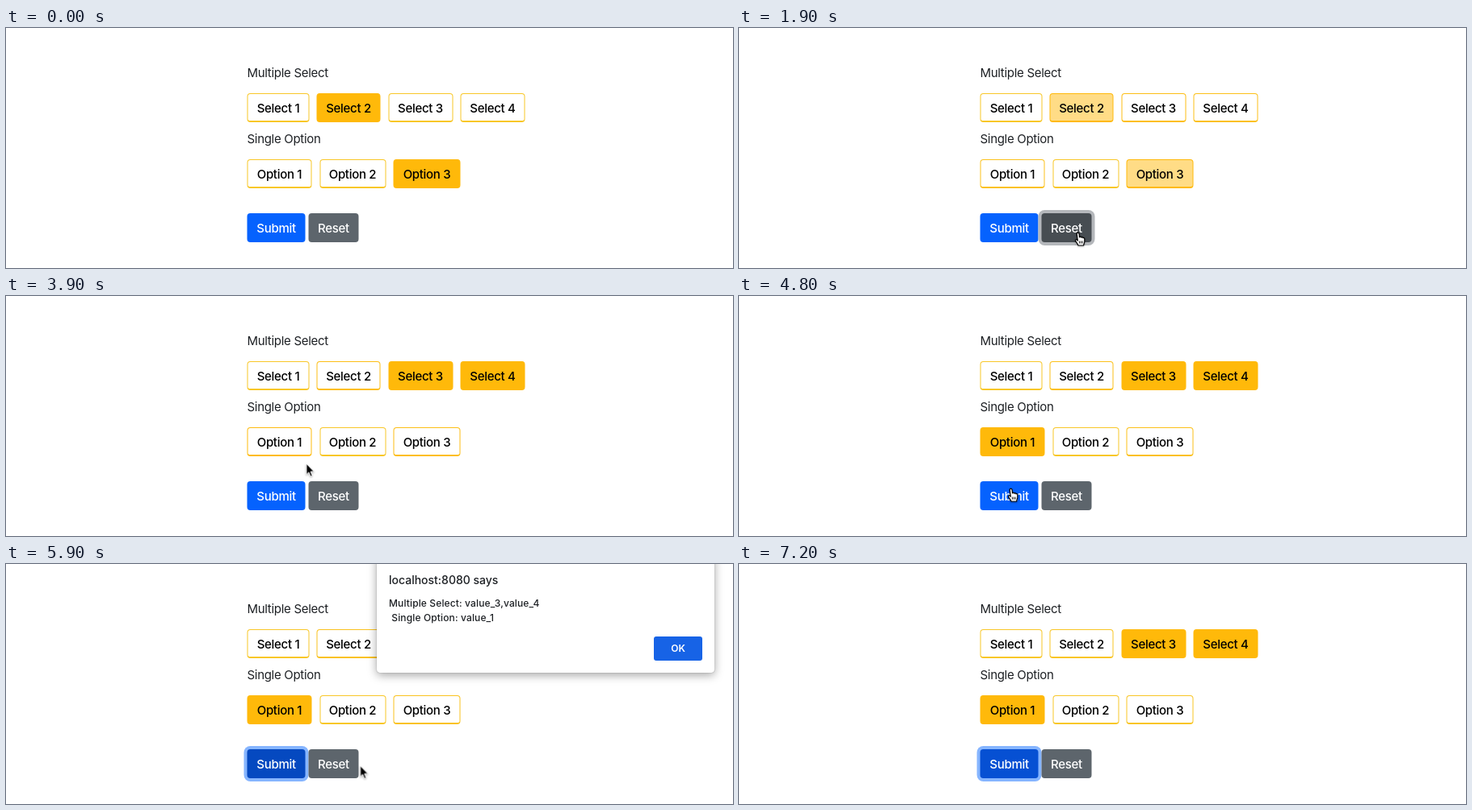
Recreate the animation shown at these times as an HTML page. Size 900 px wide and 298 px high, loop 8000 ms.

```html
<!DOCTYPE html>
<html lang="en">
<head>
<meta charset="utf-8">
<title>Toggle buttons</title>
<style>
  :root {
    --amber: #ffb90a;
    --blue: #0562fe;
    --gray: #5d656c;
  }
  html, body {
    margin: 0;
    width: 100%;
    height: 100%;
    overflow: hidden;
    background: #fff;
  }
  .stage {
    position: relative;
    width: 900px;
    height: 298px;
    overflow: hidden;
    font: 15px Inter, "Open Sans", sans-serif;
    letter-spacing: -.3px;
    color: #1d2024;
  }
  .stage * {
    position: absolute;
    box-sizing: border-box;
    white-space: pre;
    animation: 8s linear infinite;
  }
  .label { left: 298.5px; line-height: 21px; }

  .btn {
    height: 36px;
    border-radius: 4px;
    font-weight: 450;
    line-height: 37px;
    text-align: center;
    color: #fff;
    transform: translateX(-.5px);
  }
  .toggle {
    border: 1px solid #f8c728;
    border-bottom-width: 2px;
    line-height: 35px;
    color: #000;
    background: #fff;
  }
  .multi { top: 81px; }
  .single { top: 163px; }
  .action { top: 230px; }

  .s2, .o3 { animation-name: clear; }
  .s3 { animation-name: pick3; }
  .s4 { animation-name: pick4; }
  .o1 { animation-name: pick1; }
  .submit { background: var(--blue); animation-name: submit; }
  .reset { background: var(--gray); animation-name: reset; }

  @keyframes clear {
    0%, 22.8125% { background: var(--amber); border-color: var(--amber); }
    24.6875%, 100% { background: #fff; }
  }
  @keyframes pick3 {
    0%, 33.75% { background: #fff; }
    35.625%, 100% { background: var(--amber); border-color: var(--amber); }
  }
  @keyframes pick4 {
    0%, 43.75% { background: #fff; }
    45.625%, 100% { background: var(--amber); border-color: var(--amber); }
  }
  @keyframes pick1 {
    0%, 56.25% { background: #fff; }
    58.125%, 100% { background: var(--amber); border-color: var(--amber); }
  }
  @keyframes reset {
    0%, 13.125% { background: var(--gray); }
    15%, 22.5% { background: #4f565c; box-shadow: 0 0 0 0 #b4b7bb; }
    23.75%, 25% { background: #474d52; box-shadow: 0 0 0 4px #b4b7bb; }
    26.25%, 33.75% { background: #4f565c; box-shadow: 0 0 0 4px #b4b7bb; }
    34.9%, 100% { background: var(--gray); box-shadow: 0 0 0 0 #b4b7bb; }
  }
  @keyframes submit {
    0%, 60% { background: var(--blue); }
    61.875%, 65% { background: #0851d6; box-shadow: 0 0 0 0 #86b5ff; }
    66.25%, 81.25% { background: #0549c0; box-shadow: 0 0 0 4px #86b5ff; }
    82.5%, 100% { background: #0650d3; box-shadow: 0 0 0 4px #86b5ff; }
  }

  .dialog {
    left: 459px;
    top: -10px;
    width: 418px;
    height: 145px;
    border-radius: 4px;
    background: #fff;
    box-shadow: 0 0 1px rgba(0, 0, 0, .5), 0 3px 12px rgba(0, 0, 0, .36);
    visibility: hidden;
    animation-name: dialog;
    animation-timing-function: step-end;
  }
  .dialog * { left: 15px; line-height: 20px; font-weight: 500; }
  .title { top: 20px; font-size: 14px; letter-spacing: 0; }
  .line { font-size: 12px; letter-spacing: .13px; }
  .dialog .ok {
    left: 343px;
    top: 100px;
    width: 60px;
    height: 30px;
    border-radius: 3px;
    font-size: 12px;
    font-weight: 600;
    line-height: 30px;
    text-align: center;
    letter-spacing: 0;
    color: #fff;
    background: #1763e6;
    animation-name: ok;
  }
  @keyframes dialog {
    0% { visibility: hidden; }
    68.75% { visibility: visible; }
    81.25%, 100% { visibility: hidden; }
  }
  @keyframes ok {
    0%, 77.5% { background: #1763e6; }
    78.75%, 100% { background: #2b70e9; }
  }

  .cursor { left: 0; top: 0; animation-name: travel; }
  .cursor svg {
    left: 0;
    top: 0;
    overflow: visible;
    width: 16px;
    height: 18px;
    filter: drop-shadow(0 1px 1px rgba(0, 0, 0, .3));
    animation-timing-function: step-end;
  }
  .cursor .arrow { animation-name: arrow; }
  .cursor .hand { left: -4px; animation-name: hand; }

  @keyframes travel {
    0%, 7.4% { transform: translate(404px, 304px); }
    12.5% { transform: translate(423px, 274px); }
    17.5%, 26.25% { transform: translate(419px, 254px); }
    28.75% { transform: translate(480px, 160px); }
    31.25%, 36.25% { transform: translate(535px, 97px); }
    40%, 45.625% { transform: translate(611px, 98px); }
    46.875% { transform: translate(515px, 147px); }
    48.75% { transform: translate(372px, 208px); }
    50% { transform: translate(356px, 232px); }
    52.5% { transform: translate(350px, 204px); }
    53.75%, 58.125% { transform: translate(346px, 184px); }
    60% { transform: translate(336px, 239px); }
    61.25%, 71.25% { transform: translate(335px, 241px); }
    72.5% { transform: translate(388px, 257px); }
    73.75% { transform: translate(437px, 251px); }
    75% { transform: translate(590px, 204px); }
    76.875% { transform: translate(760px, 130px); }
    78.75%, 82.5% { transform: translate(832px, 104px); }
    88.75%, 100% { transform: translate(770px, -24px); }
  }
  @keyframes hand {
    0% { opacity: 0; }
    13.75% { opacity: 1; }
    27% { opacity: 0; }
    30.5% { opacity: 1; }
    37% { opacity: 0; }
    37.6% { opacity: 1; }
    46.25% { opacity: 0; }
    49.9% { opacity: 1; }
    50.5% { opacity: 0; }
    53% { opacity: 1; }
    58.8% { opacity: 0; }
    59.7% { opacity: 1; }
    68.75%, 100% { opacity: 0; }
  }
  @keyframes arrow {
    0% { opacity: 1; }
    13.75% { opacity: 0; }
    27% { opacity: 1; }
    30.5% { opacity: 0; }
    37% { opacity: 1; }
    37.6% { opacity: 0; }
    46.25% { opacity: 1; }
    49.9% { opacity: 0; }
    50.5% { opacity: 1; }
    53% { opacity: 0; }
    58.8% { opacity: 1; }
    59.7% { opacity: 0; }
    68.75%, 100% { opacity: 1; }
  }
</style>
</head>
<body>
<div class="stage">
  <div class="label" style="top:45px">Multiple Select</div>
  <div class="btn toggle multi" style="left:299px;width:77px">Select 1</div>
  <div class="btn toggle multi s2" style="left:385px;width:79px">Select 2</div>
  <div class="btn toggle multi s3" style="left:473.5px;width:80px">Select 3</div>
  <div class="btn toggle multi s4" style="left:563px;width:80px">Select 4</div>

  <div class="label" style="top:127px">Single Option</div>
  <div class="btn toggle single o1" style="left:299px;width:80px">Option 1</div>
  <div class="btn toggle single" style="left:388.5px;width:82px">Option 2</div>
  <div class="btn toggle single o3" style="left:480px;width:83px">Option 3</div>

  <div class="btn action submit" style="left:299px;width:72px">Submit</div>
  <div class="btn action reset" style="left:375px;width:62px">Reset</div>

  <div class="dialog">
    <div class="title">localhost:8080 says</div>
    <div class="line" style="top:48.5px">Multiple Select: value_3,value_4</div>
    <div class="line" style="top:67px"> Single Option: value_1</div>
    <div class="ok">OK</div>
  </div>

  <div class="cursor">
    <svg class="arrow" viewBox="0 0 16 18">
      <path d="M0 0v13.5l3-2.8 2.1 5 2.2-.9-2.1-4.9h4.3z" fill="#000" stroke="#fff"/>
    </svg>
    <svg class="hand" viewBox="0 0 16 18">
      <path d="M3.2 1.6c0-1.9 2.6-1.9 2.8 0l.5 4.2c.3-1 2.1-.9 2.3.3.5-.8 2-.5 2.1.6.7-.6 1.9 0 1.9 1.1v3.4c0 1.6-1 2.4-1.2 4.8H5c-.5-2-2.3-3.6-3.4-5.6-.6-1.2.8-2.4 2-1.2l.7.8z" fill="#fff" stroke="#000" stroke-width="1.2" stroke-linejoin="round"/>
      <path d="M6.4 10.5v3M8.3 10.5v3M10.2 10.5v3" stroke="#000" stroke-width=".9"/>
    </svg>
  </div>
</div>
</body>
</html>
```
